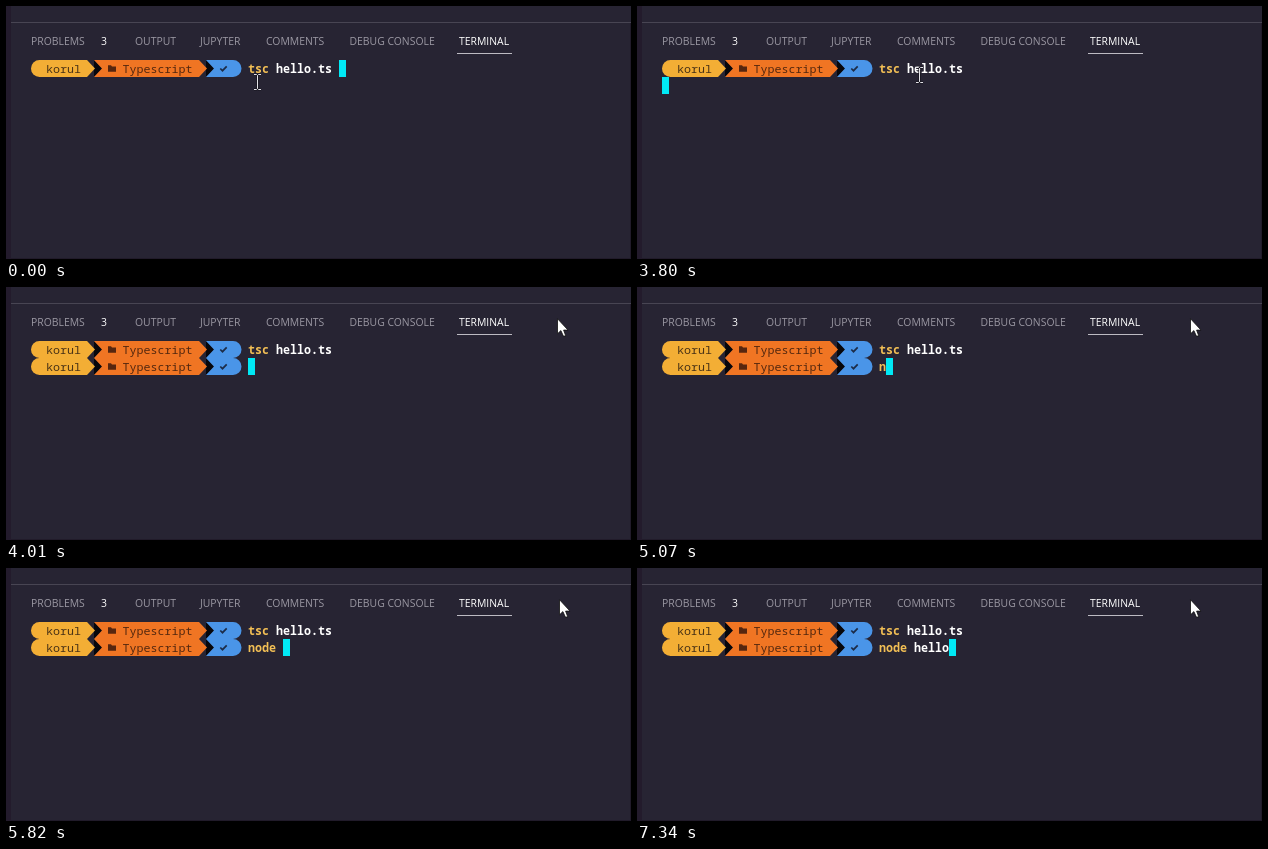
Recreate the animation shown at these times as an HTML page. Size 625x253 px, loop 8000 ms.

```html
<!DOCTYPE html>
<html lang="en">
<head>
<meta charset="utf-8">
<title>Terminal</title>
<style>
  html, body { margin: 0; width: 100%; height: 100%; overflow: hidden; background: #272433; }
  svg { display: block; width: 625px; height: 253px; }
  text { white-space: pre; }
  .tab { font: 10.4px "Open Sans", "Noto Sans", sans-serif; fill: #9b98a3; }
  .on { fill: #fff; }
  .mono { font: 500 11.67px "Noto Sans Mono", monospace; }
  .cmd { font-weight: 600; fill: #f2bf55; }
  .arg { fill: #fff; }
</style>
</head>
<body>
<svg viewBox="0 0 625 253">
  <defs>
    <g id="prompt">
      <path d="M88 0L96 8.5L88 17zM200 0L208 8.5L200 17z" fill="#07070b"/>
      <path d="M33.5 0H81L89 8.5L81 17H33.5a8.5 8.5 0 0 1 0-17z" fill="#f3ae35"/>
      <path d="M88 0H193L201 8.5L193 17H88L96 8.5z" fill="#f07523"/>
      <path d="M200 0H227a8.5 8.5 0 0 1 0 17H200L208 8.5z" fill="#4a95e8"/>
      <path d="M102 5.2h3l1 1.2h4v5.4h-8z" fill="#56260f"/>
      <path d="M214.3 8.5l2.2 2.2l4.2-4.4" fill="none" stroke="#1c2c48" stroke-width="1.7"/>
      <text class="mono" x="40" y="12.7" fill="#4a3316">korul</text>
      <text class="mono" x="116.5" y="12.7" fill="#54280f">Typescript</text>
    </g>
  </defs>
  <rect width="625" height="253" fill="#272433"/>
  <rect width="5" height="253" fill="#231b2c"/>
  <rect x="5" y="16" width="620" height="1" fill="#484553"/>
  <rect x="5" y="252" width="620" height="1" fill="#211b2a"/>
  <rect x="624" y="17" width="1" height="236" fill="#211b2a"/>
  <g id="tabs"></g>
  <rect x="451" y="47" width="55" height="1" fill="#bdbbc3"/>

  <use href="#prompt" y="54"/>
  <text class="mono cmd" x="242" y="66.7">tsc <tspan class="arg">hello.ts</tspan></text>
  <g id="line2">
    <use href="#prompt" y="71"/>
    <text class="mono cmd" x="242" y="83.7"><tspan id="cmd"></tspan><tspan id="arg" class="arg"></tspan></text>
  </g>
  <rect id="caret" width="7" height="17" fill="#00e9f5"/>

  <g id="beam" fill="none">
    <path d="M-3.5-7.5H-1L0-6.5L1-7.5H3.5M0-6.5V6.5M-3.5 7.5H-1L0 6.5L1 7.5H3.5" stroke="#15131c" stroke-width="2.2"/>
    <path d="M-3.5-7.5H-1L0-6.5L1-7.5H3.5M0-6.5V6.5M-3.5 7.5H-1L0 6.5L1 7.5H3.5" stroke="#e4e3e8"/>
  </g>
  <path id="arrow" d="M.5 .7V15.8L3.9 12.6L6.3 18H8.8L6.6 12.1H11z" fill="#fff" stroke="#111" stroke-width=".8"/>
</svg>
<script>
const LOOP = 8000, ENTER = 790, READY = 4010;
const $ = id => document.getElementById(id);

const tabs = [[25, "PROBLEMS"], [95, "3", 1], [129, "OUTPUT"], [194, "JUPYTER"],
  [260, "COMMENTS"], [343.5, "DEBUG CONSOLE"], [453, "TERMINAL", 1]];
$("tabs").innerHTML = tabs.map(([x, label, on]) =>
  `<text class="tab${on ? " on" : ""}" x="${x}" y="39">${label}</text>`).join("");

// time, x, y, pointer shape
const mouse = [
  [0, 251.5, 76, "beam"], [3800, 282.5, 69, "beam"], [3870, 374, 55, "beam"],
  [3940, 476, 40, "arrow"], [4010, 551, 31, "arrow"], [4080, 552, 31, "arrow"],
  [4150, 553, 31, "arrow"]
];
const typed = "node hello";
const keys = [5070, 5270, 5480, 5630, 5820, 6680, 6940, 7070, 7200, 7340];

const place = (el, x, y) => el.setAttribute("transform", `translate(${x} ${y})`);
const show = (el, on) => el.setAttribute("visibility", on ? "visible" : "hidden");

function draw(t) {
  const n = keys.filter(k => k <= t).length;
  $("cmd").textContent = typed.slice(0, Math.min(n, 4));
  $("arg").textContent = typed.slice(4, Math.max(n, 4));
  show($("line2"), t >= READY);

  if (t < ENTER) place($("caret"), 333, 54);
  else place($("caret"), t < READY ? 25 : 242 + 7 * n, 71);

  const [, x, y, shape] = mouse.filter(m => m[0] <= t).pop();
  for (const id of ["beam", "arrow"]) show($(id), id === shape);
  place($(shape), x, y);
}

const start = performance.now();
function tick() {
  draw((performance.now() - start) % LOOP);
  requestAnimationFrame(tick);
}
tick();
</script>
</body>
</html>
```
